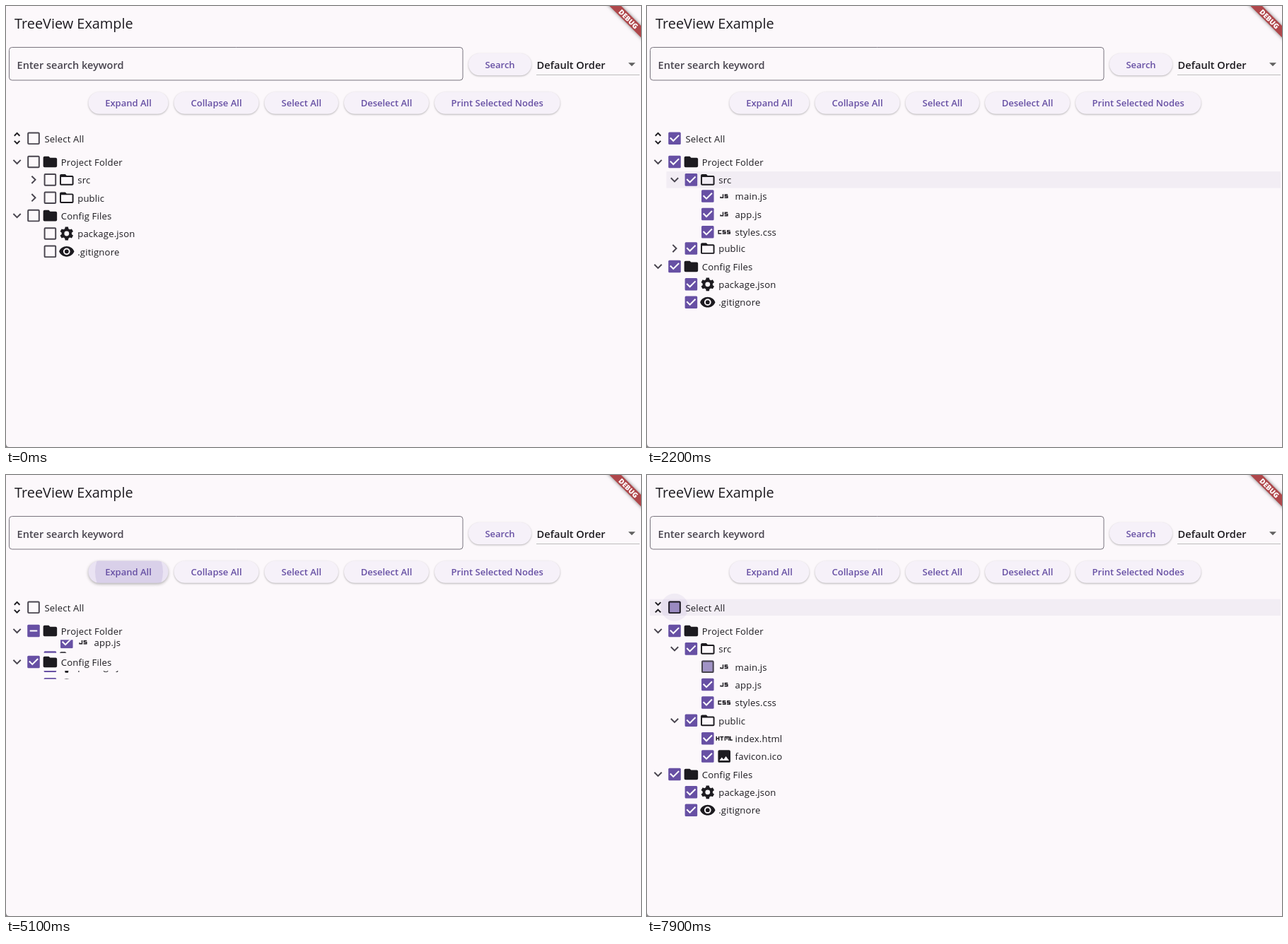
An HTML page with a canvas for the animation above (8000 ms loop, 898x624 px).

```html
<!DOCTYPE html>
<html lang="en">
<head>
<meta charset="utf-8">
<title>TreeView Example</title>
<style>
html, body { margin: 0; width: 100%; height: 100%; overflow: hidden; background: #fcf8fb; }
canvas { display: block; }
</style>
</head>
<body>
<canvas id="stage" width="898" height="624"></canvas>
<script>
const ctx = document.getElementById('stage').getContext('2d');
const W = 898, H = 624, LOOP = 8000, TICK = 100;
const S = 0.975;            // interface scale
const ROW = 25.37, STEP = 23.4, TOP = 207.8, ALL_Y = 187.3;
const INK = '#1d1b20', GREY = '#49454f', PURPLE = '#6750a4';
const FONT = '"Open Sans", "Noto Sans", sans-serif';
let t = 0;

// ---------- icons, on a 24-unit grid ----------
const sLetter = x => `M${x + 4.6} 9.75H${x + 0.75}V12H${x + 4.25}V14.25H${x}`;
const fills = {
  folder: 'M10 4H4c-1.1 0-2 .9-2 2v12c0 1.1.9 2 2 2h16c1.1 0 2-.9 2-2V8c0-1.1-.9-2-2-2h-8z',
  open: 'M20 6h-8l-2-2H4c-1.1 0-2 .9-2 2v12c0 1.1.9 2 2 2h16c1.1 0 2-.9 2-2V8c0-1.1-.9-2-2-2zm0 12H4V8h16z',
  eye: 'M12 4.5C7 4.5 2.7 7.6 1 12c1.7 4.4 6 7.5 11 7.5s9.3-3.1 11-7.5c-1.7-4.4-6-7.5-11-7.5z' +
    'M7 12a5 5 0 0 0 10 0a5 5 0 0 0-10 0zM9 12a3 3 0 0 0 6 0a3 3 0 0 0-6 0z',
  image: 'M21 19V5c0-1.1-.9-2-2-2H5c-1.1 0-2 .9-2 2v14c0 1.1.9 2 2 2h14c1.1 0 2-.9 2-2zM8.5 13.5l2.5 3L14.5 12l4.5 6H5z'
};
const lines = {
  right: 'M9.3 6.7L14.6 12L9.3 17.3',
  down: 'M6.7 9.3L12 14.6L17.3 9.3',
  more: 'M8.1 8.3L12 4.4L15.9 8.3M8.1 15.7L12 19.6L15.9 15.7',
  less: 'M8.1 4.7L12 8.6L15.9 4.7M8.1 19.3L12 15.4L15.9 19.3',
  js: 'M10.25 9V14.25H6.75V12.8' + sLetter(12.5),
  css: 'M8 9.75H3.75V14.25H8' + sLetter(9.5) + sLetter(16),
  html: 'M.75 9V15M4.25 9V15M.75 12H4.25M6 9.75H11M8.5 9V15M13.25 15V9.75H18.75V15M16 9.75V13.5M20.75 9V14.25H24'
};
const paths = {};
for (const set of [fills, lines])
  for (const k in set) paths[k] = new Path2D(set[k]);
paths.gear = makeGear();

function makeGear() {
  const p = new Path2D(), pt = (r, a) => [12 + r * Math.sin(a), 12 - r * Math.cos(a)];
  for (let i = 0; i < 6; i++) {
    const a = i * Math.PI / 3;
    p[i ? 'lineTo' : 'moveTo'](...pt(7.4, a - 0.37));
    p.lineTo(...pt(9.9, a - 0.22));
    p.lineTo(...pt(9.9, a + 0.22));
    p.lineTo(...pt(7.4, a + 0.37));
  }
  p.closePath();
  p.moveTo(15.5, 12);
  p.arc(12, 12, 3.5, 0, 7);
  return p;
}

function icon(name, cx, cy, color = INK) {
  ctx.save();
  ctx.translate(cx, cy);
  ctx.scale(S, S);
  ctx.translate(-12, -12);
  if (lines[name]) {
    ctx.strokeStyle = color;
    ctx.lineWidth = name.length < 4 || name === 'html' ? 1.5 : 2;
    ctx.stroke(paths[name]);
  } else {
    ctx.fillStyle = color;
    ctx.fill(paths[name], 'evenodd');
  }
  ctx.restore();
}

// ---------- tree ----------
const node = (id, name, icon, kids) => ({ id, name, icon, kids });
const tree = [
  node('project', 'Project Folder', 'folder', [
    node('src', 'src', 'open', [
      node('main', 'main.js', 'js'),
      node('app', 'app.js', 'js'),
      node('styles', 'styles.css', 'css')
    ]),
    node('public', 'public', 'open', [
      node('index', 'index.html', 'html'),
      node('favicon', 'favicon.ico', 'image')
    ])
  ]),
  node('config', 'Config Files', 'folder', [
    node('package', 'package.json', 'gear'),
    node('ignore', '.gitignore', 'eye')
  ])
];

// ---------- timeline ----------
// time, node (or every node), open?
const folds = [[1950, 'src', 1], [4100, '*', 0], [5000, '*', 1], [6400, '*', 0], [7100, '*', 1]];
// time, row under the pointer, part under the pointer
const hovers = [
  [0], [800, 'all', 'box'], [1000, 'project', 'box'], [1600, 'project'], [1700], [1800, 'src'],
  [2400, 'main'], [2500, 'main', 'box'], [2800, 'app', 'box'], [2900, 'styles'], [3200],
  [5600, 'all', 'box'], [5700, 'all', 'icon'], [6000, 'all', 'press'], [6300, 'all', 'icon'],
  [6500, 'all', 'press'], [6900, 'all', 'icon'], [7200, 'all', 'press'], [7500, 'all', 'icon'],
  [7600, 'all'], [7700, 'all', 'box']
];
const buttonHovers = [[0], [3900, 'Expand All'], [4000, 'Collapse All'], [4800], [4900, 'Expand All'], [5400]];
const ripples = [[4100, 'Collapse All'], [5000, 'Expand All']];
const unfold = [[0, 'more'], [6000, 'less'], [6500, 'more'], [7200, 'less']];
const checks = [[-999, 'none'], [1240, 'full'], [2688, 'part'], [7840, 'full']];

const latest = list => list.filter(e => e[0] <= t).pop();
const clamp = x => Math.max(0, Math.min(1, x));

// cubic-bezier(.42, 0, .58, 1)
function ease(x) {
  let lo = 0, hi = 1;
  for (let i = 0; i < 24; i++) {
    const s = (lo + hi) / 2, r = 1 - s;
    if (1.26 * s * r * r + 1.74 * s * s * r + s * s * s < x) lo = s; else hi = s;
  }
  return lo * lo * (3 - 2 * lo);
}

function fold(n) {
  let open = +(n.id === 'project' || n.id === 'config'), v = open;
  for (const [at, id, to] of folds) {
    if (t <= at || (id !== '*' && id !== n.id) || to === open) continue;
    open = to;
    const e = ease(clamp((t - at) / 300));
    v = to ? e : 1 - e;
  }
  return { open, v };
}

function markOf(id, phase) {
  if (phase === 'none') return 'off';
  if (phase === 'part') {
    if (id === 'main' || id === 'all') return 'off';
    if (id === 'project' || id === 'src') return 'dash';
  }
  return 'on';
}

// ---------- drawing ----------
function text(s, x, y, size, color, weight = 400, align = 'left', gap = 0) {
  ctx.font = `${weight} ${size}px ${FONT}`;
  ctx.letterSpacing = gap + 'px';
  ctx.textAlign = align;
  ctx.fillStyle = color;
  ctx.fillText(s, x, y);
}

function disc(x, y, r, color) {
  ctx.fillStyle = color;
  ctx.beginPath();
  ctx.arc(x, y, r, 0, 7);
  ctx.fill();
}

function roundRect(x, y, w, h, r) {
  ctx.beginPath();
  ctx.roundRect(x, y, w, h, r);
}

function tick(kind, x, y, w, size) {
  ctx.strokeStyle = '#fff';
  ctx.lineWidth = 2;
  ctx.beginPath();
  if (kind === 'dash') {
    const half = 0.3 * w * Math.sqrt(size);
    ctx.moveTo(x + w / 2 - half, y + w / 2);
    ctx.lineTo(x + w / 2 + half, y + w / 2);
  } else {
    const a = clamp(size * 2), b = clamp(size * 2 - 1);
    ctx.moveTo(x + w * 0.15, y + w * 0.45);
    ctx.lineTo(x + w * (0.15 + 0.25 * a), y + w * (0.45 + 0.25 * a));
    if (b) ctx.lineTo(x + w * (0.4 + 0.45 * b), y + w * (0.7 - 0.45 * b));
  }
  ctx.stroke();
}

function checkbox(id, cx, cy, hot) {
  const i = checks.indexOf(latest(checks));
  const from = markOf(id, checks[Math.max(0, i - 1)][1]), to = markOf(id, checks[i][1]);
  const p = from === to ? 1 : clamp((t - checks[i][0]) / 200);
  const w = 18 * S, x = cx - w / 2, y = cy - w / 2;
  let fill = 1, kind = to, size = 1;
  if (to === 'off') {
    fill = from === 'off' ? 0 : clamp(2 - 2 * p);
    kind = from;
    size = clamp(1 - 2 * p);
  } else if (from === 'off') {
    fill = clamp(2 * p);
    size = clamp(2 * p - 1);
  } else if (from === 'on' && to === 'dash') {
    kind = p < 0.5 ? 'on' : 'dash';
    size = Math.abs(2 * p - 1);
  }
  if (hot) disc(cx, cy, 20 * S, fill ? 'rgba(103,80,164,.08)' : 'rgba(29,27,32,.08)');
  if (fill) {
    ctx.globalAlpha = fill;
    ctx.fillStyle = PURPLE;
    roundRect(x, y, w, w, 1.5);
    ctx.fill();
    ctx.globalAlpha = 1;
  }
  if (fill < 1) {
    ctx.strokeStyle = hot ? INK : GREY;
    ctx.lineWidth = 2 * S;
    roundRect(x + S, y + S, w - 2 * S, w - 2 * S, 1);
    ctx.stroke();
  }
  if (fill && size) tick(kind, x, y, w, size);
}

function rowBase(id, name, left, cy) {
  const [, row, part] = latest(hovers);
  if (row === id) {
    ctx.fillStyle = '#f2edf4';
    ctx.fillRect(left, cy - 11.7, 896 - left, 23.4);
  }
  checkbox(id, left + 35, cy, row === id && part === 'box');
  return row === id ? part : '';
}

const heightOf = list => list.reduce((h, n) => h + ROW + (n.kids ? heightOf(n.kids) * fold(n).v : 0), 0);

function drawNodes(list, level, y) {
  for (const n of list) {
    const left = 4 + STEP * level, cy = y + ROW / 2;
    rowBase(n.id, n.name, left, cy);
    icon(n.icon, left + 58.4, cy);
    text(n.name, left + 73.8, cy + 5.3, 13.1, INK, 400, 'left', 0.18);
    y += ROW;
    if (!n.kids) continue;
    const { open, v } = fold(n);
    icon(open ? 'down' : 'right', left + 11.6, cy, GREY);
    if (!v) continue;
    const full = heightOf(n.kids), shown = full * v;
    ctx.save();
    if (v < 1) {
      ctx.beginPath();
      ctx.rect(0, y, W, shown);
      ctx.clip();
    }
    drawNodes(n.kids, level + 1, y - (full - shown) / 2);
    ctx.restore();
    y += shown;
  }
}

function selectAllRow() {
  const part = rowBase('all', 'Select All', 4, ALL_Y);
  if (part === 'icon' || part === 'press')
    disc(15.6, ALL_Y, 11.2, `rgba(29,27,32,${part === 'press' ? 0.14 : 0.09})`);
  icon(latest(unfold)[1], 15.6, ALL_Y, INK);
  text('Select All', 54.4, ALL_Y + 5.5, 13.1, INK, 400, 'left', 0.18);
}

function button(label, x, y, w) {
  const h = 31.2, hot = latest(buttonHovers)[1] === label;
  ctx.save();
  ctx.shadowColor = hot ? 'rgba(0,0,0,.32)' : 'rgba(0,0,0,.28)';
  ctx.shadowBlur = hot ? 4 : 2.5;
  ctx.shadowOffsetY = hot ? 1.5 : 1;
  ctx.fillStyle = hot ? '#eae3f3' : '#f6f1f9';
  roundRect(x, y, w, h, h / 2);
  ctx.fill();
  ctx.restore();
  for (const [at, name] of ripples) {
    const age = t - at;
    if (name !== label || age <= 0 || age >= 500) continue;
    ctx.save();
    roundRect(x, y, w, h, h / 2);
    ctx.clip();
    disc(x + w / 2 + 1, y + h / 2, 20 + age * 0.28, `rgba(103,80,164,${0.13 * clamp((500 - age) / 300)})`);
    ctx.restore();
  }
  text(label, x + w / 2, y + 20.6, 13, PURPLE, 600, 'center');
}

function banner() {
  ctx.save();
  ctx.translate(W, 0);
  ctx.rotate(Math.PI / 4);
  ctx.shadowColor = 'rgba(0,0,0,.5)';
  ctx.shadowBlur = 5;
  ctx.fillStyle = '#af474b';
  ctx.fillRect(-60, 19.8, 120, 11.7);
  ctx.shadowBlur = 0;
  text('DEBUG', 0.5, 29.3, 9.9, '#fff', 800, 'center');
  ctx.restore();
}

function header() {
  text('TreeView Example', 12, 31.5, 19.9, INK);
  ctx.strokeStyle = '#79747e';
  ctx.lineWidth = 1;
  roundRect(4.5, 58.5, 641.5, 46.5, 4);
  ctx.stroke();
  text('Enter search keyword', 15.6, 89, 14.5, GREY, 600);
  button('Search', 654, 67, 89);
  text('Default Order', 750.6, 89, 14.6, INK, 600);
  ctx.fillStyle = '#616161';
  ctx.beginPath();
  ctx.moveTo(880, 80.3);
  ctx.lineTo(890, 80.3);
  ctx.lineTo(885, 85.2);
  ctx.fill();
  ctx.fillStyle = '#bdbdbd';
  ctx.fillRect(750, 97, 146, 1);
  button('Expand All', 116.5, 121.5, 113);
  button('Collapse All', 237.5, 121.5, 120);
  button('Select All', 365.5, 121.5, 104.5);
  button('Deselect All', 478, 121.5, 120);
  button('Print Selected Nodes', 606, 121.5, 177.5);
}

function corner() {
  ctx.fillStyle = '#8a888a';
  ctx.beginPath();
  ctx.moveTo(0, H - 5);
  ctx.quadraticCurveTo(0, H, 5, H);
  ctx.lineTo(0, H);
  ctx.fill();
}

function frame(now) {
  t = Math.floor(now % LOOP / TICK) * TICK;
  ctx.fillStyle = '#fcf8fb';
  ctx.fillRect(0, 0, W, H);
  header();
  selectAllRow();
  drawNodes(tree, 0, TOP);
  banner();
  corner();
  requestAnimationFrame(frame);
}
requestAnimationFrame(frame);
</script>
</body>
</html>
```
